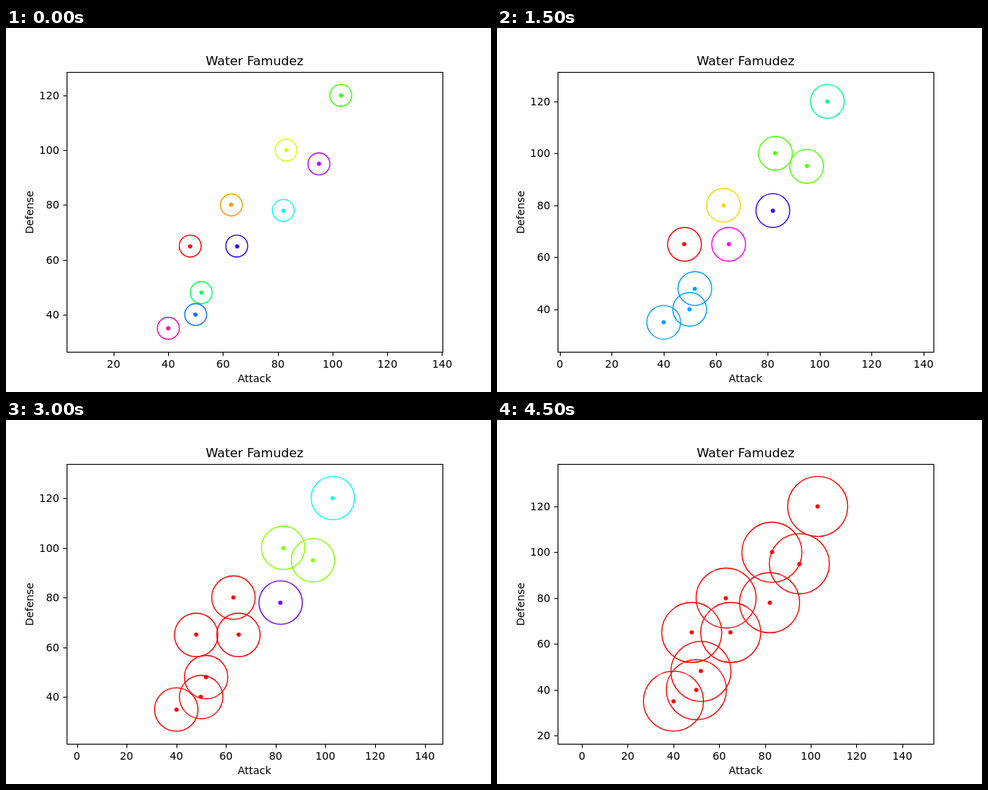
Recreate the animation shown at these times as an HTML page with a canvas. Size 640 by 480 pixels, loop 5000 ms.

```html
<!DOCTYPE html>
<html lang="en">
<head>
<meta charset="utf-8">
<title>Cluster growth</title>
<style>
  html, body { margin: 0; width: 100%; height: 100%; overflow: hidden; background: #fff; }
  canvas { display: block; }
</style>
</head>
<body>
<canvas id="chart" width="640" height="480"></canvas>
<script>
const ctx = document.getElementById('chart').getContext('2d');
const STEP_MS = 500;
const PT = 100 / 72; // pixels per point
const BOX = { left: 80, right: 576, top: 57.6, bottom: 427.2 };

// [attack, defense]
const points = [
  [48, 65], [63, 80], [83, 100], [103, 120], [52, 48],
  [82, 78], [50, 40], [65, 65], [95, 95], [40, 35]
];
// Squared link distance per step; circles have half that distance as radius.
const squaredReach = [64, 68, 125, 169, 229, 289, 305, 365, 458, 689];

// Single-linkage clusters, numbered in order of first appearance.
function clusterPoints(reach) {
  const labels = points.map(() => -1);
  let count = 0;
  const spread = (i, label) => {
    labels[i] = label;
    points.forEach(([x, y], j) => {
      const distance = (x - points[i][0]) ** 2 + (y - points[i][1]) ** 2;
      if (labels[j] < 0 && distance <= reach) spread(j, label);
    });
  };
  points.forEach((_, i) => { if (labels[i] < 0) spread(i, count++); });
  return { labels, count };
}

// 256-entry hue map that stops just short of a full turn.
const hue = fraction => `hsl(${354.375 * Math.floor(fraction * 256) / 255} 100% 50%)`;

function line(x1, y1, x2, y2) {
  ctx.beginPath();
  ctx.moveTo(x1, y1);
  ctx.lineTo(x2, y2);
  ctx.stroke();
}

function text(string, x, y, align = 'center', points = 10) {
  ctx.font = `${points * PT}px "DejaVu Sans", sans-serif`;
  ctx.textAlign = align;
  ctx.fillText(string, x, y);
}

function disc(x, y, radius) {
  ctx.beginPath();
  ctx.arc(x, y, radius, 0, 2 * Math.PI);
}

function draw(step) {
  const reach = squaredReach[step];
  const radius = Math.sqrt(reach) / 2;
  const scale = (BOX.bottom - BOX.top) / ((85 + 2 * radius) * 1.1);
  const toX = value => 328 + (value - 71.5) * scale;
  const toY = value => 242.4 - (value - 77.5) * scale;
  const { labels, count } = clusterPoints(reach);
  const colors = labels.map(label => hue(label / count));

  ctx.fillStyle = '#fff';
  ctx.fillRect(0, 0, 640, 480);

  ctx.lineWidth = PT;
  points.forEach(([x, y], i) => {
    ctx.strokeStyle = colors[i];
    disc(toX(x), toY(y), radius * scale);
    ctx.stroke();
  });
  points.forEach(([x, y], i) => {
    ctx.fillStyle = colors[i];
    disc(Math.round(toX(x)), Math.round(toY(y)), 2 * PT);
    ctx.fill();
  });

  ctx.strokeStyle = ctx.fillStyle = '#000';
  ctx.lineWidth = 0.8 * PT;
  ctx.strokeRect(80.5, 58.5, 496, 369);

  for (let value = 0; value <= 140; value += 20) {
    const x = toX(value), y = toY(value);
    if (x >= BOX.left && x <= BOX.right) {
      const column = Math.round(x) + 0.5;
      line(column, 428, column, 432.5);
      text(value, x, 448);
    }
    if (y >= BOX.top && y <= BOX.bottom) {
      const row = Math.round(y) + 0.5;
      line(75.5, row, 80, row);
      text(value, 70.3, Math.round(y) + 5, 'right');
    }
  }

  text('Water Famudez', 328, 49, 'center', 12);
  text('Attack', 328, 467);
  ctx.save();
  ctx.translate(36, 243);
  ctx.rotate(-Math.PI / 2);
  text('Defense', 0, 0);
  ctx.restore();
}

const start = performance.now();
function tick() {
  draw(Math.floor((performance.now() - start) / STEP_MS) % squaredReach.length);
  requestAnimationFrame(tick);
}
tick();
</script>
</body>
</html>
```
